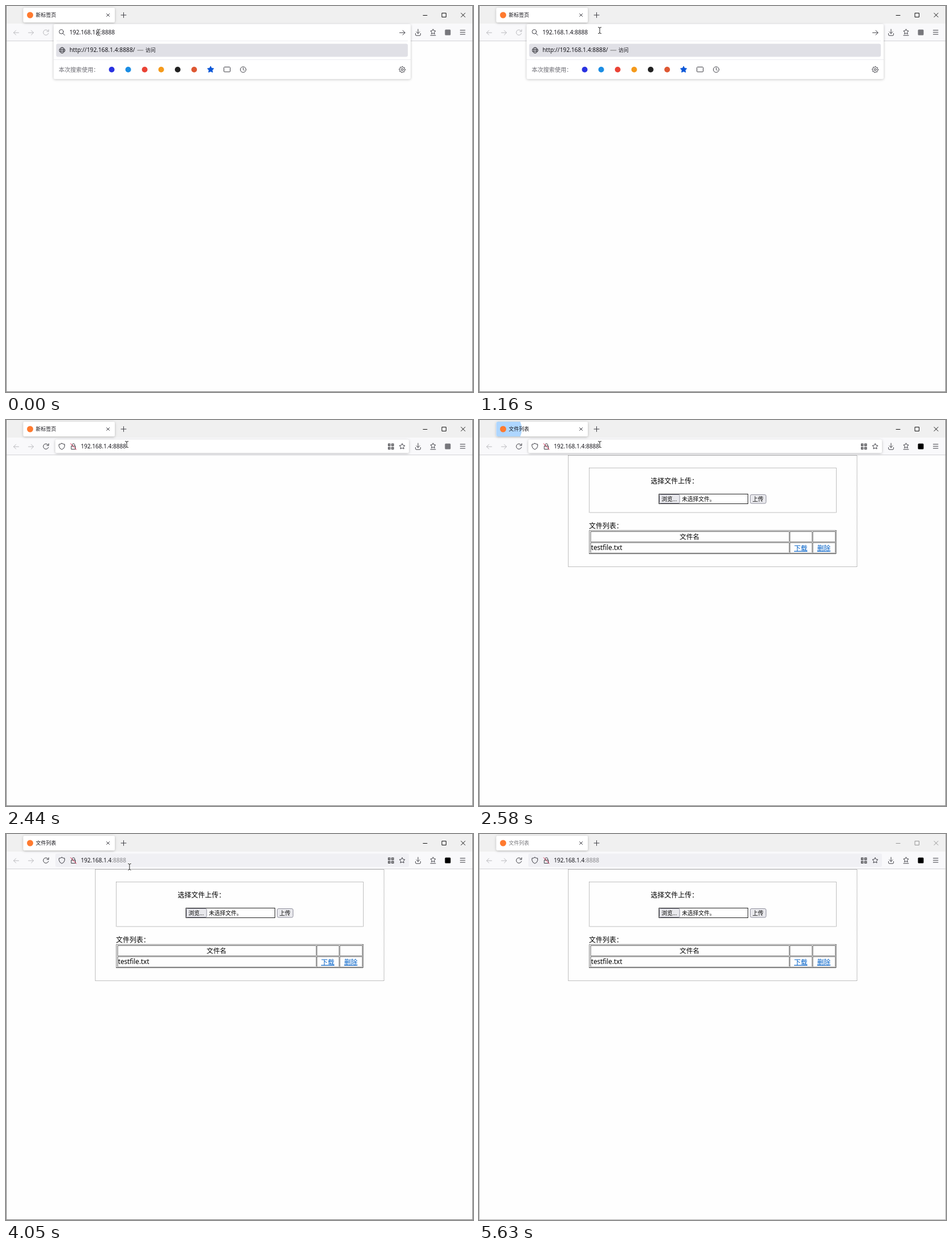
An HTML page for the animation above (5770 ms loop, 824x680 px).

```html
<!DOCTYPE html>
<html lang="zh-CN">
<head>
<meta charset="utf-8">
<title>文件列表</title>
<style>
  html, body { margin: 0; width: 100%; height: 100%; overflow: hidden; background: #fefefe; }
  svg { display: block; }
  text { font-family: "Noto Sans", "Noto Sans CJK SC", "Noto Sans CJK", sans-serif; white-space: pre; }
  .line { fill: none; stroke-width: 1; stroke-linecap: round; stroke-linejoin: round; }
</style>
</head>
<body>
<svg id="stage" width="824" height="680" viewBox="0 0 824 680"></svg>
<script>
const LOOP = 5770, INK = '#3c3c43', PALE = '#b9b9bd', LINK = '#0060c8';

const rect = (x, y, w, h, fill, extra = '') =>
  `<rect x="${x}" y="${y}" width="${w}" height="${h}" fill="${fill}" ${extra}/>`;
const dot = (x, y, r, fill) => `<circle cx="${x}" cy="${y}" r="${r}" fill="${fill}"/>`;
const line = (d, color = INK, extra = '') => `<path class="line" d="${d}" stroke="${color}" ${extra}/>`;
const text = (x, y, size, str, fill = '#15141a', extra = '') =>
  `<text x="${x}" y="${y}" font-size="${size}" fill="${fill}" ${extra}>${str}</text>`;
const group = (id, body) => `<g id="${id}">${body}</g>`;
const ring = (x, y, r, color = INK) =>
  `<circle class="line" cx="${x}" cy="${y}" r="${r}" stroke="${color}"/>`;

function star(x, y, r, fill, stroke) {
  const points = Array.from({ length: 10 }, (_, i) => {
    const a = i * Math.PI / 5 - Math.PI / 2, d = i % 2 ? r * 0.5 : r;
    return `${(x + d * Math.cos(a)).toFixed(2)},${(y + d * Math.sin(a)).toFixed(2)}`;
  });
  return `<polygon points="${points.join(' ')}" fill="${fill}" stroke="${stroke}" stroke-linejoin="round"/>`;
}

function gear(x, y) {
  const points = Array.from({ length: 32 }, (_, i) => {
    const a = i * Math.PI / 16, d = i % 4 < 2 ? 5.4 : 4.1;
    return `${(x + d * Math.cos(a)).toFixed(2)},${(y + d * Math.sin(a)).toFixed(2)}`;
  });
  return `<polygon class="line" points="${points.join(' ')}" stroke="${INK}"/>` + ring(x, y, 1.8);
}

function bevel(x, y, w, h, light, dark) {
  return line(`M${x} ${y + h}V${y}H${x + w}`, light) + line(`M${x + w} ${y}V${y + h}H${x}`, dark);
}

const dotted = (x, y, w, h) =>
  rect(x, y, w, h, 'none', 'stroke="#808080" stroke-dasharray="1 1"');

const reload = color =>
  line('M74.6 44.3A4.7 4.7 0 1 0 75 48', color) + line('M75.3 41.6V44.9H72', color);

function frame() {
  const edgeMarks = [107, 132, 207, 233, 310, 335, 411, 436]
    .map((y, i) => `M.5 ${y}v${i % 2 ? 10 : 7}`).join('');
  return rect(0, 0, 824, 31, '#f0f0f0') + rect(0, 31, 824, 30, '#f9f9fb') +
    rect(0, 61, 824, 1, '#d3d3d6') +
    rect(30.5, 3, 161.5, 26, '#fff', 'rx="3" filter="url(#soft)"') +
    group('burst', '<circle id="wave" cx="42" cy="16" fill="#aed6ff" clip-path="url(#tab)"/>') +
    dot(42.5, 16, 5.5, '#ff7a2f') +
    '<text id="title" x="52.5" y="19.4" font-size="9"></text>' +
    line('M177.5 13.5l5 5m0-5l-5 5') + line('M203 16h9M207.5 11.5v9') +
    group('controls', line('M736 16.5h7M769.5 12.5h7v7h-7zM803 12.5l7 7m0-7l-7 7', 'currentColor', 'stroke-linecap="butt"')) +
    line('M22.5 47H13.5m4-4l-4 4l4 4M39.5 47h9m-4-4l4 4l-4 4', PALE) +
    line('M727 41v7.5m-3-3l3 3l3-3M722.5 48.5v2q0 1.5 1.5 1.5h6q1.5 0 1.5-1.5v-2') +
    star(753.5, 45.5, 4.8, 'none', INK) + line('M749 51.8h9') +
    rect(774.5, 41.5, 10, 10, '#000', 'id="extension" rx="1.5"') +
    line('M801.5 42.7h8.5m-8.5 3.6h8.5m-8.5 3.6h8.5') +
    line(edgeMarks, '#777', 'id="marks" stroke-dasharray="2 2"') +
    line('M.5 0V679.5H823.5V0', '#777', 'id="border"');
}

function dropdown() {
  const engines = ['#2932e1', '#1b8de4', '#ea4335', '#f59a1b', '#222', '#de5833']
    .map((color, i) => dot(186.5 + i * 29.1, 112, 5, color)).join('');
  return reload(PALE) +
    rect(84, 32, 630, 96.5, '#fff', 'rx="3" filter="url(#soft)"') +
    rect(89, 61, 620, 1, '#ececf0') + rect(84, 94, 630, 1, '#ececf0') +
    ring(97.5, 45.3, 3.7) + line('M100.3 48.2l3.2 3.2') +
    text(112, 50, 10.1, '192.168.1.4:8888') +
    line('M694.5 47h9.5m-4-4l4 4l-4 4') +
    rect(88.5, 66.5, 620.5, 23, '#e0e0e6', 'rx="3"') +
    ring(99, 78, 4.9) + '<ellipse class="line" cx="99" cy="78" rx="2.2" ry="4.9" stroke="#3c3c43"/>' +
    line('M94.3 76.5h9.4m-9.4 3h9.4', INK, 'stroke-width=".8"') +
    text(112, 81.3, 10.25, 'http://192.168.1.4:8888/') +
    line('M232 78h10', '#777') + text(246, 80.8, 9, '访问') +
    text(93, 115.7, 10.2, '本次搜索使用：', '#6b6b72') + engines +
    star(361, 112, 5.9, '#0b57d8', '#0b57d8') +
    rect(384.5, 107.5, 11, 8.5, 'none', `rx="1" stroke="${INK}"`) +
    ring(418.5, 112, 5) + line('M418.5 109v3l2 1.6') + gear(699, 112);
}

function addressBar() {
  const tiles = [[674, 41.5], [680, 41.5], [674, 47.5], [680, 47.5]]
    .map(([x, y]) => rect(x + .5, y + .5, 3.4, 3.4, '#aaa', `stroke="${INK}"`)).join('');
  return reload(INK) +
    rect(87, 34.5, 624, 23.5, '#fff', 'id="field" rx="3"') +
    line('M98.5 41.3q2.5 1.4 5 1.5v3.4q-.5 4-5 5.8q-4.500-1.800-5-5.800v-3.400q2.500-.1 5-1.500z') +
    line('M115.500 46h7v5.500h-7zM116.700 46v-2q0-2.300 2.300-2.300t2.300 2.300v2') +
    line('M114 41.500l10 10.500', '#e0224e') +
    text(132, 50, 10.1, '192.168.1.4<tspan id="port">:8888</tspan>') +
    tiles + star(699, 46.7, 5.2, 'none', INK);
}

function page() {
  const cells = [196, 215.5].map(y =>
    [[197, 350], [548.5, 39], [589, 39.5]].map(([x, w]) => bevel(x, y + .5, w, 18, '#555', '#999')).join('')).join('');
  const link = (x, str) => text(x, 229.7, 11.7, str, LINK, 'text-decoration="underline"');
  return dotted(157.5, 62.5, 509.500, 196) + dotted(194.5, 84.5, 436, 78.5) +
    text(303, 111.8, 12, '选择文件上传：', '#000') +
    rect(317.5, 130.5, 157, 17, '#fff', 'stroke="#222"') +
    rect(318.5, 131.5, 35.5, 15, '#e9e9ed', 'rx="2" stroke="#8f8f9d"') +
    text(322, 142.900, 9.75, '浏览...', '#000') + text(358, 142.900, 9.75, '未选择文件。', '#000') +
    rect(478.5, 131.5, 28, 15.5, '#e9e9ed', 'rx="2.5" stroke="#8f8f9d"') +
    text(482.5, 142.900, 9.75, '上传', '#000') +
    text(194, 190.900, 12, '文件列表：', '#000') +
    bevel(194.5, 194.5, 435.5, 41, '#888', '#444') + cells +
    text(371.5, 209.8, 11.7, '文件名', '#000', 'text-anchor="middle"') +
    text(197.7, 229.2, 11.7, 'testfile.txt', '#000') + link(556, '下载') + link(596.7, '删除');
}

const beam = 'M-2.500-5.500Q0-5.500 0-4Q0-5.500 2.500-5.500M0-4V4M-2.500 5.500Q0 5.500 0 4Q0 5.500 2.500 5.500';

document.getElementById('stage').innerHTML =
  `<defs>
    <filter id="soft" x="-10%" y="-30%" width="120%" height="160%">
      <feDropShadow dx="0" dy="1" stdDeviation="2" flood-color="#000" flood-opacity=".25"/>
    </filter>
    <clipPath id="tab"><rect x="30.5" y="3" width="161.500" height="26" rx="3"/></clipPath>
  </defs>` +
  rect(0, 0, 824, 680, '#fefefe') + frame() +
  group('address', addressBar()) + group('page', page()) + group('dropdown', dropdown()) +
  rect(160, 40, 1, 13, '#15141a', 'id="caret"') +
  group('beam', line(beam, '#fff', 'style="stroke-width:2.500"') + line(beam, '#222')) +
  group('arrow', '<path d="M0 0V12L2.800 9.500L4.600 13.700L6.500 12.900L4.700 8.700H8.300Z" fill="#fff" stroke="#222" stroke-width=".9"/>');

const el = id => document.getElementById(id);
const show = (id, on) => el(id).setAttribute('display', on ? 'inline' : 'none');
const set = (id, name, value) => el(id).setAttribute(name, value);

// Pointer waypoints: time, x, y
const path = [
  [0, 163.5, 46.5], [180, 163.5, 46.5], [340, 178, 54], [500, 206, 63], [580, 217, 65], [660, 220, 61],
  [810, 217, 50], [950, 214, 39], [1090, 213, 41], [1160, 213, 43], [3910, 213, 43], [3980, 214, 46],
  [4120, 222, 70], [4260, 250, 125], [4400, 302, 214], [4530, 369, 315], [4600, 423, 399],
  [4670, 474, 472.5], [4740, 521, 525], [4880, 612, 594], [5020, 703, 641], [5160, 782, 670], [5230, 783, 675]
];
const bursts = [[260, 810, 7], [880, 1160, 4], [2440, 2920, 7], [3980, 4530, 8], [4600, 5160, 8]];

function hold(t) {
  let held = 0;
  for (const [start, end, count] of bursts) {
    if (t < start) break;
    const step = (end - start) / count;
    held = Math.min(end, start + Math.floor((t - start) / step + 1e-6) * step);
  }
  return t >= 5230 ? 5230 : held;
}

function pointer(t) {
  const i = path.findIndex(p => p[0] > t);
  if (i < 0) return path[path.length - 1].slice(1);
  const [t0, x0, y0] = path[i - 1], [t1, x1, y1] = path[i], k = (t - t0) / (t1 - t0);
  return [x0 + (x1 - x0) * k, y0 + (y1 - y0) * k];
}

function render(t) {
  const entered = t >= 2440, loaded = t >= 2510, settled = t >= 2650, inactive = t >= 5630;
  const held = hold(t), [x, y] = pointer(held);

  show('dropdown', !entered);
  show('address', entered);
  show('page', loaded);
  set('field', 'fill', settled ? '#f0f0f4' : '#fff');
  if (settled) el('field').removeAttribute('filter');
  else set('field', 'filter', 'url(#soft)');
  set('port', 'fill', settled ? '#858589' : '#15141a');
  set('extension', 'fill', loaded ? '#000' : '#77777c');

  el('title').textContent = loaded ? '文件列表' : '新标签页';
  set('title', 'fill', inactive ? '#77777b' : '#15141a');
  set('controls', 'color', inactive ? '#949494' : '#111');
  set('border', 'stroke', inactive ? '#adadad' : '#777');
  set('marks', 'stroke', inactive ? '#6f86e0' : '#777');

  const age = Math.max(0, held - 2510);
  show('burst', loaded && t < 2920);
  set('wave', 'r', 6 + 29 * (age / 70) ** 1.3);
  set('wave', 'opacity', Math.max(0, Math.min(1, 1 - (held - 2580) / 340)));

  const early = t < 70 || (t >= 600 && t < 1160), late = t >= 1690 && t < 2220;
  show('caret', early || late);
  set('caret', 'x', late ? 192 : 160);

  const overPage = y > 60 && t > 3900;
  show('beam', !overPage);
  show('arrow', overPage && t < 5300);
  set('beam', 'transform', `translate(${x} ${y})`);
  set('arrow', 'transform', `translate(${x} ${y})`);
}

const start = performance.now();
function tick() {
  render((performance.now() - start) % LOOP);
  requestAnimationFrame(tick);
}
tick();
</script>
</body>
</html>
```
